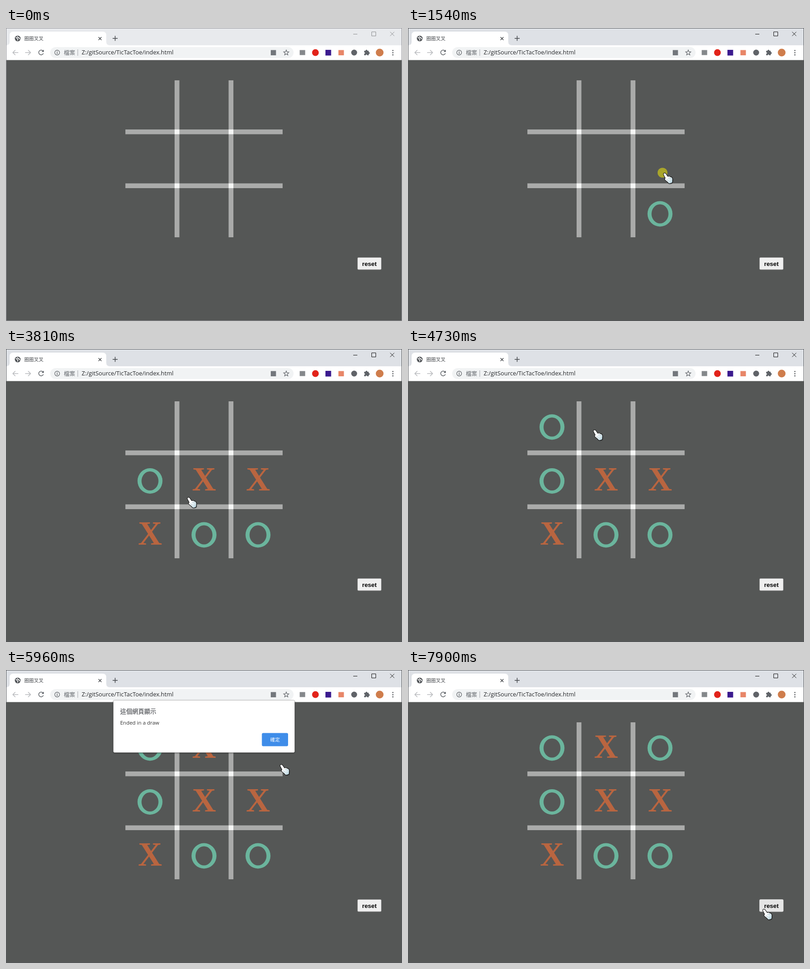
Recreate the animation shown at these times as an HTML page. Size 869 px wide and 644 px high, loop 8000 ms.

```html
<!DOCTYPE html>
<html lang="zh-Hant">
<head>
<meta charset="utf-8">
<title>圈圈叉叉</title>
<style>
html, body { margin: 0; width: 100%; height: 100%; overflow: hidden; background: #555756; }
svg { display: block; width: 869px; height: 644px; }
text { font-family: "Open Sans", "Noto Sans CJK TC", "Noto Sans CJK JP", "Noto Sans CJK", sans-serif; }
.x { font: bold 73px "Liberation Serif", "Times New Roman", serif; fill: #b96540; text-anchor: middle; }
.o { fill: #6bb59d; fill-rule: evenodd; }
.line { fill: none; stroke: #5f6368; stroke-width: 1.5; }
.dark { stroke: #45484c; }
.faint { stroke: #b9bbbe; }
.thin { stroke-width: 1.2; }
#reset text { font: bold 13.33px "Liberation Sans", Arial, sans-serif; text-anchor: middle; }
</style>
</head>
<body>
<svg viewBox="0 0 869 644">
  <defs>
    <linearGradient id="glove" x1="0" y1="0" x2="1" y2="1">
      <stop offset=".45" stop-color="#fff"/><stop offset="1" stop-color="#a9cbd8"/>
    </linearGradient>
    <filter id="shade" x="-10%" y="-10%" width="120%" height="130%">
      <feDropShadow dx="0" dy="1" stdDeviation="1.5" flood-opacity=".5"/>
    </filter>
  </defs>

  <rect width="869" height="644" fill="#555756"/>
  <rect id="bar" width="869" height="38"/>
  <rect y="38" width="869" height="32.5" fill="#fff"/>

  <!-- tab -->
  <path fill="#fff" d="M0 38q8 0 8-8V16q0-8 8-8H212q8 0 8 8V30q0 8 8 8z"/>
  <circle cx="25.7" cy="23" r="6.3" fill="#505357"/>
  <path d="M21.5 20.5l3 2 1.5 3-1 2M25 18l.5 2.5 3 .5v2l2.5 1" fill="none" stroke="#fff" stroke-width="1.6"/>
  <text x="40" y="27" font-size="10.6" fill="#45484c">圈圈叉叉</text>
  <path class="line dark" d="M203 20l6.5 6.5m0-6.5l-6.5 6.5M234 22.7h11M239.5 17.2v11"/>

  <path id="winButtons" fill="none" d="M762 13.5h9M802.5 8.5h9v9h-9zM843 8.5l9 9m0-9l-9 9"/>

  <!-- toolbar -->
  <path class="line faint" d="M27 54H15m5.5-5.5L15 54l5.5 5.5M42 54h12m-5.5-5.5L54 54l-5.5 5.5"/>
  <path class="line" d="M81.5 51a5.2 5.2 0 1 0 .5 4.5"/>
  <path d="M83 47.5v5h-5z" fill="#5f6368"/>
  <rect x="97" y="42" width="534" height="24" rx="12" fill="#f1f3f4"/>
  <circle class="line thin" cx="112.3" cy="54" r="5.3"/>
  <path class="line" d="M112.3 53v4M112.3 50.5v1.4"/>
  <text x="127" y="58.5" font-size="12.2" fill="#5f6368">檔案</text>
  <path d="M157.5 47v14" stroke="#a3a6aa"/>
  <text x="166" y="58.3" font-size="12.85" fill="#26282b">Z:/gitSource/TicTacToe/index.html</text>
  <rect x="581" y="48.5" width="11.5" height="11.5" fill="#73777c"/>
  <path id="star" class="line thin"/>
  <rect x="644.5" y="48.5" width="12" height="11" fill="#85888b"/>
  <circle cx="679" cy="54" r="7.4" fill="#e2231a"/>
  <rect x="701" y="48" width="12.5" height="12.5" fill="#3b1a8f"/>
  <rect x="729.5" y="48.5" width="12" height="11.5" fill="#e88668"/>
  <circle cx="764" cy="54" r="6.5" fill="#606368"/>
  <g fill="#5f6368">
    <rect x="786" y="50" width="10" height="10" rx="1"/>
    <circle cx="791" cy="49.8" r="2"/><circle cx="796.3" cy="55" r="2"/>
  </g>
  <path d="M786 55h.01M791 60h.01" stroke="#fff" stroke-width="3.4" stroke-linecap="round"/>
  <circle cx="820" cy="54" r="8.5" fill="#cf7d4c"/>
  <path d="M849 49.5h.01M849 54.3h.01M849 59.1h.01" stroke="#505357" stroke-width="2.7" stroke-linecap="round"/>

  <g id="board"></g>
  <g id="reset">
    <rect x="771.5" y="504.5" width="52" height="26.5" rx="2"/>
    <text x="797.4" y="523">reset</text>
  </g>

  <rect id="frame" x=".5" y=".5" width="868" height="643" fill="none"/>

  <g id="dialog">
    <rect x="235.5" y="66.5" width="398" height="115" rx="3" fill="#fff" stroke="#000" stroke-opacity=".22" filter="url(#shade)"/>
    <text x="250.5" y="96" font-size="13.2" fill="#303338">這個網頁顯示</text>
    <text x="250.5" y="120.3" font-size="11.45" fill="#333">Ended in a draw</text>
    <rect x="561.5" y="138.5" width="57.5" height="29" rx="3" fill="#3f8de9"/>
    <text x="579.7" y="157.2" font-size="10.7" fill="#fff">確定</text>
  </g>

  <g id="cursor">
    <circle id="press" cx="-1.5" r="10.8" fill="#a9a52b"/>
    <path id="handShade" fill="#222" opacity=".6" transform="translate(1 1)"/>
    <path id="hand" fill="url(#glove)" stroke="#111" stroke-width="1.1" stroke-linejoin="round"/>
    <path d="M10.5 12.5q2-2 4-.5q2.5-.5 3.5 1.5M6.5 14.5l5 3" fill="none" stroke="#9fb9c4" stroke-width=".9"/>
  </g>
</svg>
<script>
const LOOP = 8000, CELL = 118.5, BAR = 10.5;
const OPEN = 5270, CLOSE = 6720;   // dialog
const ACTIVATE = 1090, HOVER = 7690;
const $ = id => document.getElementById(id);
const set = (el, attrs) => { for (const k in attrs) el.setAttribute(k, attrs[k]); };

function add(tag, attrs) {
  const el = document.createElementNS("http://www.w3.org/2000/svg", tag);
  set(el, attrs);
  return $("board").appendChild(el);
}

const bar = (x, y, width, height, fill) => add("rect", { x, y, width, height, fill });
for (const k of [0, 1]) {
  bar(370 + k * CELL, 115, BAR, 345, "#aaabaa");
  bar(262, 223 + k * CELL, 345, BAR, "#aaabaa");
}
for (const k of [0, 1, 2, 3]) bar(370 + k % 2 * CELL, 223 + (k >> 1) * CELL, BAR, BAR, "#f5f6f5");

const handPath = "M2 .8C.4 1.4 0 3.2.9 5L4.6 12C2.6 12.4 2.8 15.4 4.8 16.8L9.4 20.6 11.6 23.4C14 24.6 18.8 23.6 20.4 21.2L20.8 14C20 10.5 18 9 16 9.2 14.8 8 12.4 7.4 10.2 8.2L6 2.2C4.8.6 3.4.3 2 .8Z";
for (const id of ["hand", "handShade"]) $(id).setAttribute("d", handPath);

const starPoints = [...Array(10)].map((_, i) => {
  const a = i * Math.PI / 5, r = i % 2 ? 2.6 : 6;
  return [615 + r * Math.sin(a), 54.3 - r * Math.cos(a)];
});
$("star").setAttribute("d", "M" + starPoints.join("L") + "Z");

// Pointer stops: time, place, and the cell clicked there, if any
const stops = [
  { t: 150, x: 741, y: 543 },
  { t: 1090, x: 545, y: 396, cell: 8 },
  { t: 1540, x: 560, y: 318, cell: 5 },
  { t: 2190, x: 430, y: 400, cell: 7 },
  { t: 2530, x: 430, y: 322, cell: 4 },
  { t: 2760, x: 429, y: 322 },
  { t: 3050, x: 320, y: 300, cell: 3 },
  { t: 3490, x: 308, y: 399, cell: 6 },
  { t: 3920, x: 428, y: 300 },
  { t: 4350, x: 316, y: 177, cell: 0 },
  { t: 4780, x: 412, y: 177, cell: 1 },
  { t: 5130, x: 544, y: 176, cell: 2 },
  { t: 5730, x: 601, y: 207 },
  { t: 6010, x: 601, y: 207 },
  { t: CLOSE - 80, x: 586, y: 153, click: true },
  { t: 6870, x: 586, y: 153 },
  { t: 7850, x: 778, y: 525 }
];
const clicks = stops.filter(s => s.click || "cell" in s);

// Turns alternate; the dialog holds back the last mark
const ellipse = (rx, ry) => `M${-rx} 0a${rx} ${ry} 0 1 1 ${2 * rx} 0a${rx} ${ry} 0 1 1 ${-2 * rx} 0z`;
const marks = stops.filter(s => "cell" in s).map(({ t, cell }, turn) => {
  const x = 316 + cell % 3 * CELL, y = 171.5 + Math.floor(cell / 3) * CELL;
  const el = turn % 2
    ? add("text", { class: "x", x, y: y + 21 })
    : add("path", { class: "o", d: ellipse(27.4, 28) + ellipse(18.6, 21), transform: `translate(${x} ${y})` });
  if (turn % 2) el.textContent = "X";
  return { el, time: t + 70 < 5200 && turn < 8 ? t + 70 : CLOSE };
});

const clamp = v => Math.min(1, Math.max(0, v));
const ease = v => v * v * (3 - 2 * v);

// Rests briefly at each stop, then glides on for at most 700 ms
function cursorAt(t) {
  const next = stops.findIndex(s => s.t > t);
  if (next < 1) return stops.at(next ? -1 : 0);
  const a = stops[next - 1], b = stops[next];
  const begin = a.t + 100, glide = Math.min(700, b.t - begin);
  const k = ease(clamp((t - begin) / glide));
  return { x: a.x + (b.x - a.x) * k, y: a.y + (b.y - a.y) * k };
}

function draw(t) {
  const active = t >= ACTIVATE, hover = t >= HOVER;
  $("bar").setAttribute("fill", active ? "#dee1e6" : "#e8eaed");
  $("winButtons").setAttribute("stroke", active ? "#111" : "#8b8c8e");
  $("frame").setAttribute("stroke", active ? "#55575b" : "#929398");
  set($("reset").firstElementChild, { fill: hover ? "#e5e5e5" : "#efefef", stroke: hover ? "#dadada" : "#a0a0a0" });
  for (const m of marks) m.el.style.display = t >= m.time ? "" : "none";

  const shown = clamp((t - OPEN) / 140) - clamp((t - CLOSE) / 180);
  set($("dialog"), { opacity: shown, transform: `translate(0 ${12 * (shown - 1)})` });

  const { x, y } = cursorAt(t);
  $("cursor").style.display = t >= stops[0].t ? "" : "none";
  $("cursor").setAttribute("transform", `translate(${x} ${y})`);
  $("press").style.display = clicks.some(s => t >= s.t && t < s.t + 80) ? "" : "none";
}

const start = performance.now();
function tick() {
  draw((performance.now() - start) % LOOP);
  requestAnimationFrame(tick);
}
tick();
</script>
</body>
</html>
```
